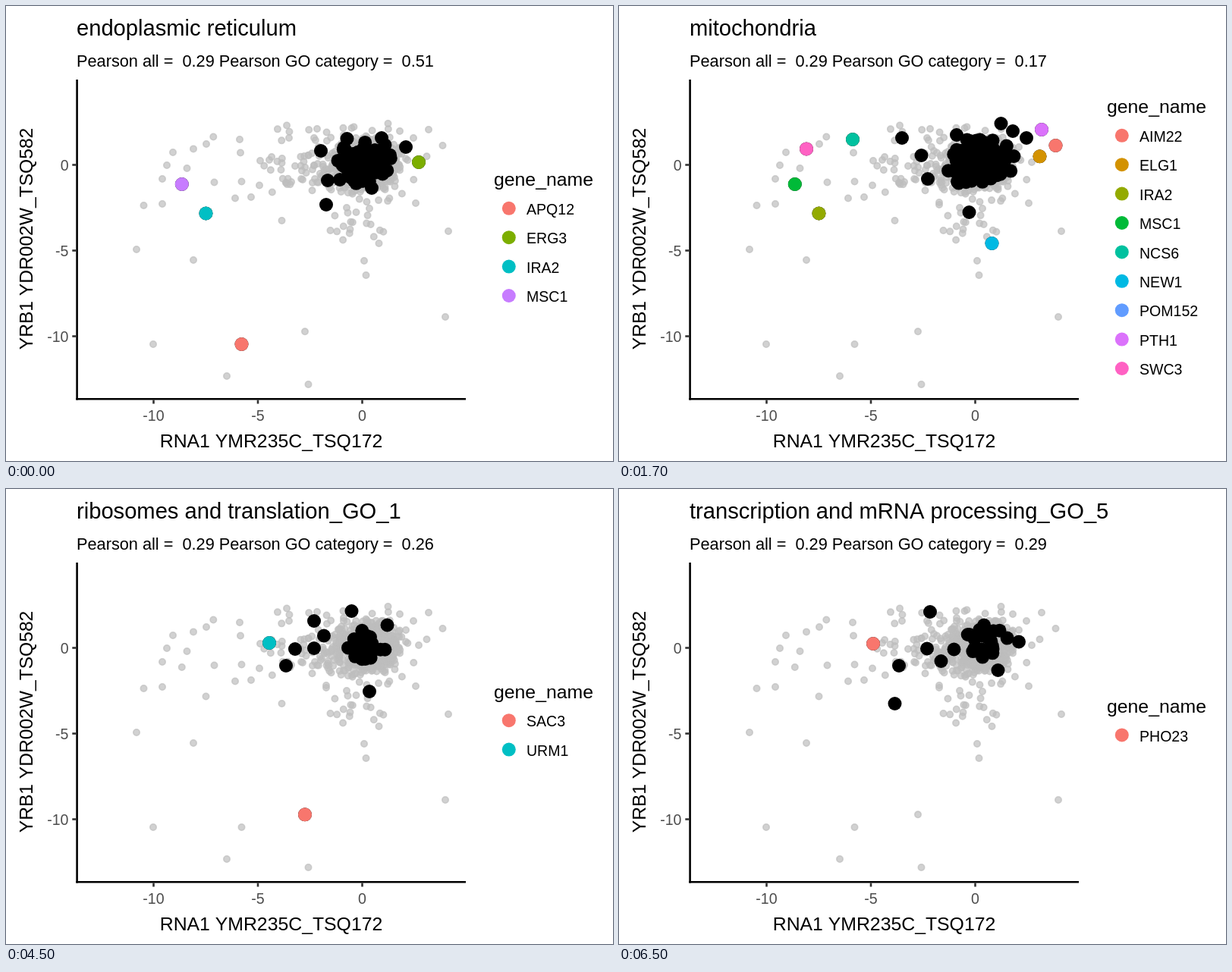
Animation of 800 by 600 pixels, one loop 8 s. Source, as an HTML page:

```html
<!DOCTYPE html>
<html lang="en">
<head>
<meta charset="utf-8">
<title>Gene category scatter</title>
<style>
  html, body { margin: 0; width: 100%; height: 100%; overflow: hidden; background: #fff; }
  svg { display: block; width: 800px; height: 600px; }
  text { font-family: "Liberation Sans", Arial, sans-serif; font-kerning: none; white-space: pre; }
  .tick { font-size: 19.56px; fill: #4d4d4d; }
  .cloud { fill: #bebebe; fill-opacity: .7; stroke: #bebebe; stroke-opacity: .7; stroke-width: 1.6; }
</style>
</head>
<body>
<svg id="stage" viewBox="0 0 800 600"></svg>
<script>
const LOOP = 8000;
const stage = document.getElementById('stage');

const genes = {
  APQ12: [310.5, 446], ERG3: [544, 206], IRA2: [263.5, 273.5], MSC1: [231.8, 235],
  AIM22: [575.5, 184], ELG1: [554.5, 198.3], NCS6: [308, 176], NEW1: [491.5, 313],
  SWC3: [247, 188.4], PTH1: [557, 163], AHC1: [357.5, 205], PHO23: [335, 204],
  SIF2: [334, 236.5], VPS72: [273.3, 172.5], SAC3: [394, 429.3], URM1: [347, 203]
};

// The isolated points; the crowd around the origin is random
const outliers = [
  [181.5, 263], [172, 321], [194, 446], [206, 228], [206, 261], [212, 210], [220, 193], [238.5, 214],
  [247, 335], [264, 182], [274.5, 232.5], [291, 488], [302, 253.5], [309, 193.5], [310.5, 231.5],
  [323, 252], [398.5, 499], [472, 336], [474.5, 355], [540, 260], [583, 297], [579, 410]
];

// far: black points that stand apart; crowd: [count, x, y, spread x, spread y]
const scenes = [
  { end: 500, title: 'endoplasmic reticulum', score: '0.51',
    labels: ['APQ12', 'ERG3', 'IRA2', 'MSC1'],
    colors: ['#f8766d', '#7cae00', '#00bfc4', '#c77cff'],
    far: [[422, 262], [415, 191], [449.5, 175], [495, 174], [527, 186], [424, 230], [440, 229], [482, 240]],
    crowd: [130, 475, 207, 17, 12] },
  { end: 2500, title: 'mitochondria', score: '0.17',
    labels: ['AIM22', 'ELG1', 'IRA2', 'MSC1', 'NCS6', 'NEW1', 'POM152', 'PTH1', 'SWC3'],
    colors: ['#f8766d', '#d39200', '#93aa00', '#00ba38', '#00c19f', '#00b9e3', '#619cff', '#db72fb', '#ff61c3'],
    far: [[373, 174], [398.5, 197], [407, 228], [445, 170], [461.5, 272], [503.5, 155], [519, 165], [537, 174]],
    crowd: [140, 477, 208, 20, 14] },
  { end: 4500, title: 'chromatin organization_GO_2', score: '-0.16',
    labels: ['AHC1', 'PHO23', 'SIF2', 'SWC3', 'VPS72'],
    colors: ['#f8766d', '#a3a500', '#00bf7d', '#00b0f6', '#e76bf3'],
    far: [[363.5, 207], [391, 229], [422, 259], [427.5, 296], [453.5, 294.5], [449, 266], [421, 215], [517.5, 188]],
    crowd: [22, 474, 218, 19, 11] },
  { end: 6500, title: 'ribosomes and translation_GO_1', score: '0.26',
    labels: ['SAC3', 'URM1'],
    colors: ['#f8766d', '#00bfc4'],
    far: [[455.5, 161], [406, 174], [419, 193.5], [381, 211], [406, 210], [369, 233], [479, 267], [502.5, 179.5]],
    crowd: [24, 476, 207, 13, 11] },
  { end: 8000, title: 'transcription and mRNA processing_GO_5', score: '0.29',
    labels: ['PHO23'],
    colors: ['#f8766d'],
    far: [[410, 162], [406, 210.5], [369, 233], [363.5, 283], [424.5, 227], [441.5, 211.5], [527, 201.5], [499.5, 239]],
    crowd: [24, 481, 204, 14, 12] }
];

function add(parent, tag, attrs, content) {
  const el = document.createElementNS('http://www.w3.org/2000/svg', tag);
  for (const key in attrs) el.setAttribute(key, attrs[key]);
  if (content !== undefined) el.textContent = content;
  return parent.appendChild(el);
}

const text = (parent, x, y, content, attrs) => add(parent, 'text', { x, y, ...attrs }, content);
const dot = (parent, [cx, cy], r, fill) => add(parent, 'circle', fill ? { cx, cy, r, fill } : { cx, cy, r });
const line = (x1, y1, x2, y2, stroke) => add(stage, 'line', { x1, y1, x2, y2, stroke, 'stroke-width': 2.6 });

let seed = 20011;
function random() {
  seed = (seed * 16807) % 2147483647;
  return seed / 2147483647;
}

// Gaussian blob without its outermost 5%
function blob(count, x, y, sx, sy) {
  return Array.from({ length: count }, () => {
    const r = Math.sqrt(-2 * Math.log(1 - 0.95 * random()));
    const a = random() * 2 * Math.PI;
    return [x + sx * r * Math.cos(a), y + sy * r * Math.sin(a)];
  });
}

function drawCloud() {
  const g = add(stage, 'g', { class: 'cloud' });
  const points = [
    ...outliers, ...Object.values(genes), ...scenes.flatMap(s => s.far),
    ...blob(520, 478, 207, 20, 15),
    ...blob(190, 465, 211, 32, 23),
    ...blob(32, 385, 213, 26, 24),
    ...blob(14, 465, 287, 20, 14)
  ];
  points.forEach(p => dot(g, p, 4.2));
}

function drawAxes() {
  line(93.6, 97, 93.6, 519.5, '#000');
  line(92.3, 518.3, 606, 518.3, '#000');
  for (const v of [-10, -5, 0]) {
    const x = 469.5 + 27.5 * v, y = 209.5 - 22.6 * v;
    line(x, 519.5, x, 524.5, '#333');
    line(87.3, y, 92.4, y, '#333');
    text(stage, x, 547, v, { class: 'tick', 'text-anchor': 'middle' });
    text(stage, 82.5, Math.round(y + 7.4), v, { class: 'tick', 'text-anchor': 'end' });
  }
  text(stage, 349.5, 582, 'RNA1 YMR235C_TSQ172', { 'font-size': 24.8, 'text-anchor': 'middle' });
  text(stage, 0, 0, 'YRB1 YDR002W_TSQ582',
    { 'font-size': 24.6, 'text-anchor': 'middle', transform: 'translate(35 307) rotate(-90)' });
}

function drawScene(s) {
  const g = add(stage, 'g', { visibility: 'hidden' });
  text(g, 93, 39, s.title, { 'font-size': 29.15 });
  text(g, 93, 80, `Pearson all =  0.29 Pearson GO category =  ${s.score}`, { 'font-size': 21.73 });

  [...s.far, ...blob(...s.crowd)].forEach(p => dot(g, p, 9, '#000'));

  const top = 324.4 - 19.2 * (s.labels.length - 1);
  text(g, 643, top - 29.5, 'gene_name', { 'font-size': 24.8 });
  s.labels.forEach((name, i) => {
    const y = top + 38.4 * i;
    dot(g, [662.8, y], 9, s.colors[i]);
    text(g, 686, y + 8.2, name, { 'font-size': 19.56 });
    if (genes[name]) {
      dot(g, genes[name], 9, '#000');
      dot(g, genes[name], 9, s.colors[i]);
    }
  });
  return g;
}

drawCloud();
drawAxes();
const layers = scenes.map(drawScene);

function tick() {
  const t = performance.now() % LOOP;
  const current = scenes.findIndex(s => t < s.end);
  layers.forEach((g, i) => g.setAttribute('visibility', i === current ? 'visible' : 'hidden'));
  requestAnimationFrame(tick);
}
tick();
</script>
</body>
</html>
```
